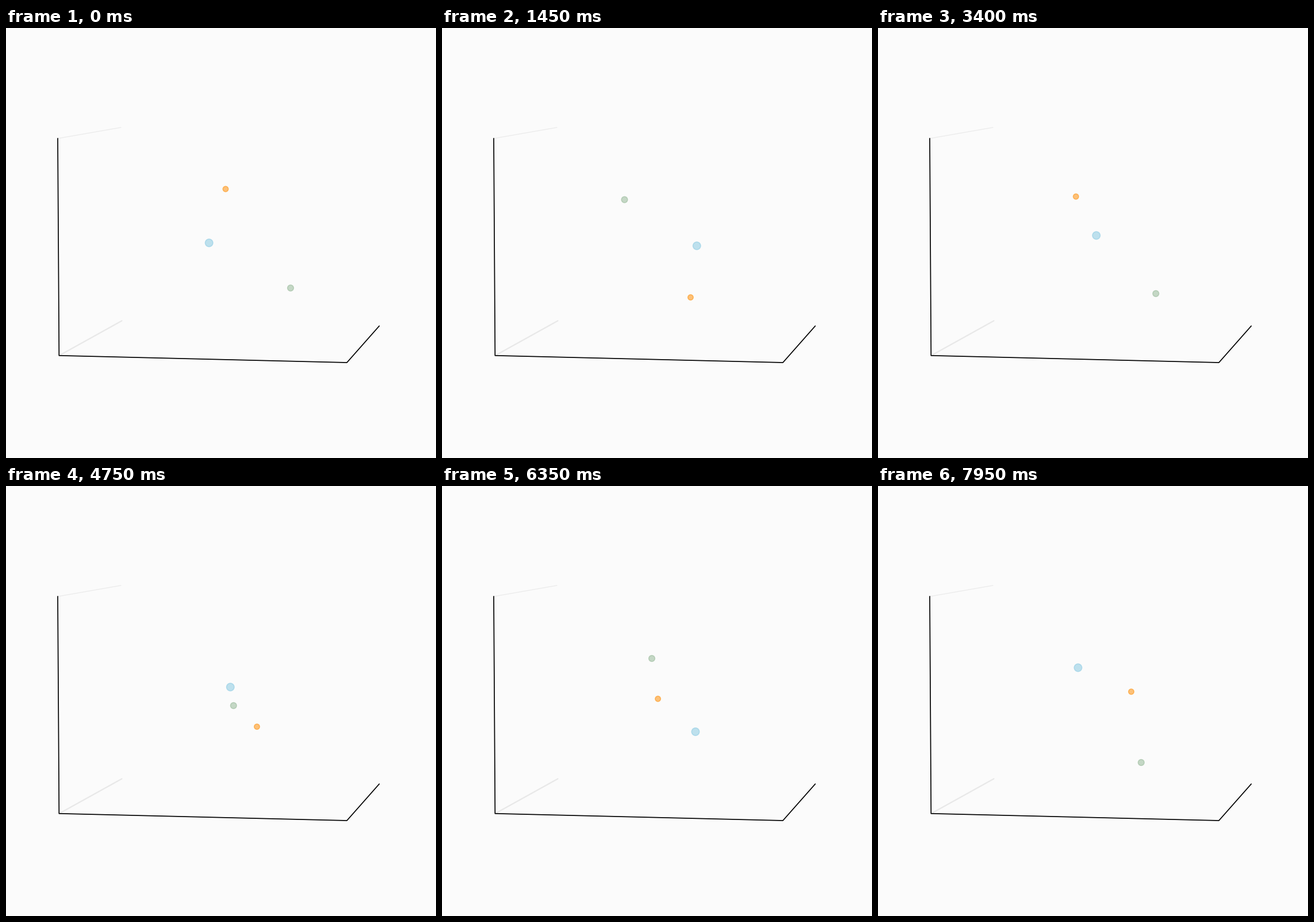
Recreate the animation shown at these times as a matplotlib script. Size 748 by 748 pixels, loop 8 s.

```python
import numpy as np
import matplotlib.pyplot as plt
from matplotlib.animation import FuncAnimation
from matplotlib.patches import Circle

SIZE, DPI = 748, 64
STEP, FRAMES = 50, 160
PX = 72 / DPI  # points per pixel

# Key poses: time in ms, green x and y, orange x and y
KEYS = np.array([
    (0, 495, 452.3, 382, 280.1),
    (1450, 317.5, 298.6, 432.4, 468.6),
    (2250, 331.5, 301.3, 447, 429.3),
    (3400, 483.3, 462, 344.3, 293.2),
    (3700, 491.8, 479.7, 334.7, 296),
    (4750, 395.8, 382, 436.5, 418.7),
    (5850, 329.5, 262.5, 423, 386),
    (6350, 365, 300, 375.6, 370.2),
    (7950, 457.8, 481, 440.5, 357.8),
])
V_START = (-0.045, 0, -0.02, 0.015)  # pixels per ms
V_END = (-0.045, -0.037, 0.05, -0.01)
M_GREEN, M_ORANGE = 0.65, 0.503  # relative to the blue body
CENTRE = np.array([402.75, 375.6])


def spline(k, p, v_start, v_end, t):
    """Cubic curve through the poses p at times k, smooth in acceleration."""
    n = len(k)
    h = np.diff(k)
    d = np.diff(p, axis=0) / h[:, None]
    a = np.eye(n)
    b = np.zeros_like(p)
    b[0], b[-1] = v_start, v_end
    for i in range(1, n - 1):
        a[i, i - 1:i + 2] = h[i], 2 * (h[i - 1] + h[i]), h[i - 1]
        b[i] = 3 * (h[i] * d[i - 1] + h[i - 1] * d[i])
    v = np.linalg.solve(a, b)

    i = np.clip(np.searchsorted(k, t, side="right") - 1, 0, n - 2)
    w = h[i][:, None]
    s = ((t - k[i]) / h[i])[:, None]
    return ((1 + 2 * s) * (1 - s) ** 2 * p[i] + s * (1 - s) ** 2 * w * v[i]
            + s ** 2 * (3 - 2 * s) * p[i + 1] + s ** 2 * (s - 1) * w * v[i + 1])


poses = spline(KEYS[:, 0], KEYS[:, 1:], V_START, V_END,
               np.arange(FRAMES) * STEP)
green, orange = poses[:, :2], poses[:, 2:]
# The common centre of mass stays at rest
blue = CENTRE * (1 + M_GREEN + M_ORANGE) - M_GREEN * green - M_ORANGE * orange

fig = plt.figure(figsize=(SIZE / DPI, SIZE / DPI), dpi=DPI, facecolor="#fbfbfb")
ax = fig.add_axes([0, 0, 1, 1])
ax.set_xlim(0, SIZE)
ax.set_ylim(SIZE, 0)
ax.axis("off")


def line(points, color, width):
    ax.plot(*zip(*points), color=color, lw=width * PX,
            solid_capstyle="round", solid_joinstyle="round")


line([(91, 192), (200, 173)], "#ebebeb", 1.3)
line([(93, 569.5), (201.5, 509.3)], "#e8e8e8", 2.2)
line([(90, 192), (92.3, 569.8), (593, 582), (649.3, 518.3)], "black", 1.7)


def body(color, radius):
    dot = Circle((0, 0), radius, facecolor=color, edgecolor=color,
                 lw=1.5 * PX, alpha=0.52)
    ax.add_patch(dot)
    return dot


bodies = [
    (body("#84c8e2", 6.7), blue),
    (body("#92b694", 5.3), green),
    (body("darkorange", 4.7), orange),
]


def draw(frame):
    for dot, track in bodies:
        dot.center = tuple(track[frame])
    return [dot for dot, _ in bodies]


anim = FuncAnimation(fig, draw, frames=FRAMES, interval=STEP,
                     repeat=True, repeat_delay=0)
plt.show()
```
